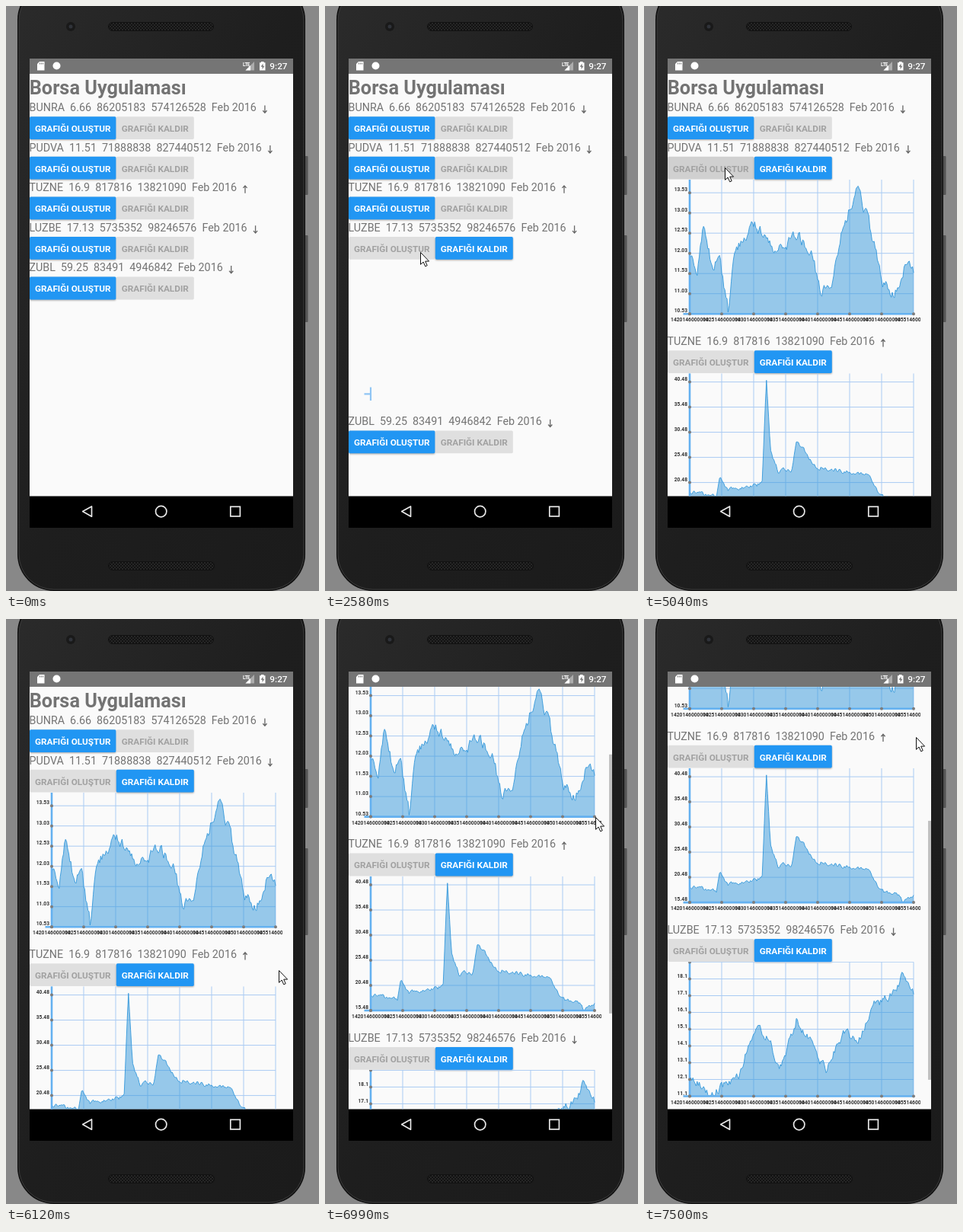
An HTML page for the animation above (7.53 s loop, 411 by 768 pixels).

```html
<!DOCTYPE html>
<html lang="tr">
<head>
<meta charset="utf-8">
<title>Borsa Uygulaması</title>
<style>
  html, body { margin: 0; width: 100%; height: 100%; overflow: hidden; background: #888; }
  svg { display: block; width: 411px; height: 768px; font-family: Roboto, sans-serif; }
  text { white-space: pre; }
  .title { font-size: 25.3px; font-weight: 700; fill: #737373; }
  .info { font-size: 14.3px; fill: #737373; }
  .arrow { fill: none; stroke: #666; stroke-width: 1.3; }
  .btn text { font-size: 11.78px; font-weight: 700; text-anchor: middle; }
  .on rect { fill: #2196f3; filter: drop-shadow(0 1.5px 1.3px rgba(0, 0, 0, .35)); }
  .on text { fill: #fff; }
  .off rect { fill: #dfdfdf; }
  .off text { fill: #a1a1a1; }
  .btn .ripple { fill: #000; filter: none; }
  .label { font-size: 6.7px; font-weight: 700; fill: #333; }
  .grid { stroke: #a9cbf3; stroke-width: 1; fill: none; }
  .axis { stroke: #64b1f0; stroke-width: 2.6; fill: none; }
  .stub { stroke: #90c5f4; stroke-width: 2.2; fill: none; }
  .area { fill: #3498db; fill-opacity: .5; }
  .line { fill: none; stroke: #3498db; stroke-width: .9; }
  .dot { fill: #7d7d7d; }
</style>
</head>
<body>
<svg viewBox="0 0 411 768">
  <defs>
    <linearGradient id="body" x1="0" y1="0" x2="1" y2="1">
      <stop offset="0" stop-color="#2b2b2b"/>
      <stop offset=".5" stop-color="#1e1e1e"/>
      <stop offset="1" stop-color="#1b1b1b"/>
    </linearGradient>
    <pattern id="mesh" width="4" height="4" patternUnits="userSpaceOnUse">
      <rect width="4" height="4" fill="#262626"/>
      <circle cx="1" cy="1" r="1" fill="#0b0b0b"/>
      <circle cx="3" cy="3" r="1" fill="#0b0b0b"/>
    </pattern>
    <clipPath id="view"><rect x="31" y="89" width="346" height="554.5"/></clipPath>
    <clipPath id="plot"><rect x="31" y="0" width="332" height="202"/></clipPath>
  </defs>

  <rect width="411" height="768" fill="#888"/>
  <rect x="391" y="197" width="5.500" height="51" rx="1" fill="#555"/>
  <rect x="391" y="301" width="5.500" height="114" rx="1" fill="#555"/>
  <rect x="15" y="-30" width="378" height="798" rx="48" fill="#111"/>
  <rect x="17" y="-27" width="374" height="793" rx="46" fill="url(#body)" stroke="#3c3c3c"/>
  <rect x="134.500" y="21.500" width="138" height="11" rx="5.500" fill="url(#mesh)" stroke="#111"/>
  <rect x="134.500" y="729.500" width="139" height="11" rx="5.500" fill="url(#mesh)" stroke="#111"/>
  <circle cx="85" cy="27" r="6" fill="#191919"/>
  <circle cx="85" cy="27" r="2.500" fill="#30333a"/>

  <rect x="31" y="69" width="346" height="616" fill="#000"/>
  <rect x="31" y="89" width="346" height="554.500" fill="#fafafa"/>
  <g clip-path="url(#view)">
    <g id="list"><text class="title" x="30.700" y="116">Borsa Uygulaması</text></g>
    <rect id="bar" x="373" width="4" height="340" fill="#c1c1c1"/>
  </g>

  <rect x="31" y="69" width="346" height="20" fill="#757575"/>
  <g fill="#fff">
    <path d="M44 73h6.500v11.500h-9.500v-8.500z"/>
    <path d="M44.500 74.500v2M46.500 74.500v2M48.500 74.500v2" stroke="#757575"/>
    <circle cx="66.500" cy="78.500" r="5"/>
    <text x="311" y="78.500" font-size="6.300" font-weight="700" letter-spacing="-.4">LTE</text>
    <path d="M326 73v11.500h-11.500z" fill-opacity=".4"/>
    <path d="M321 78v6.500h-6.500z"/>
    <path d="M333 74.200h2v-1.200h3.500v1.200h2v10.300h-7.500z"/>
    <path d="M337.500 75.500l-2.800 4.200h1.900v3.500l2.700-4.500h-1.800z" fill="#757575"/>
    <text x="346.300" y="83" font-size="11.800" font-weight="500">9:27</text>
  </g>
  <g fill="none" stroke="#e8e8e8" stroke-width="1.700">
    <path d="M112.500 657v13.200l-11.800-6.600z" stroke-linejoin="round"/>
    <circle cx="203.700" cy="663.600" r="7.200"/>
    <rect x="294.800" y="657.300" width="12.600" height="12.600"/>
  </g>
  <path id="cursor" d="M.5.5v15.800l3.600-3.300 2.600 5.800 2.500-1.100-2.500-5.600h4.900z" fill="#fff" stroke="#111"/>
</svg>

<script>
const LOOP = 7530, STEP = 30, PITCH = 52.6, CHART = 201.8;
const LEFT = 60, WIDTH = 294, BASE = 176.3;
const $ = id => document.getElementById(id);

// shape: turning points of the curve, x then height above the axis
const rows = [
  { text: 'BUNRA  6.66  86205183  574126528  Feb 2016' },
  { text: 'PUDVA  11.51  71888838  827440512  Feb 2016',
    open: 4530, fill: 4860, fade: 600, low: 10.53, unit: .5, gap: 26.5, digits: 2, noise: 13,
    shape: [0,78, 10,52, 19,122, 30,58, 38,80, 51,2, 59,80, 85,120, 115,82, 141,104, 160,80,
      172,30, 185,34, 200,110, 221,168, 235,120, 253,44, 268,24, 288,78, 294,54] },
  { text: 'TUZNE  16.9  817816  13821090  Feb 2016', up: true,
    open: 3570, fill: 3960, fade: 150, low: 15.48, unit: 5, gap: 33, digits: 2, noise: 5,
    shape: [0,21, 35,16, 39,41, 50,24, 95,31, 100.8,168, 106,76, 116,48, 134,50, 140,90,
      165,54, 235,42, 250,14, 275,11, 281,0, 294,8] },
  { text: 'LUZBE  17.13  5735352  98246576  Feb 2016',
    open: 2340, fill: 2730, fade: 240, low: 11.1, unit: 1, gap: 22, digits: 1, noise: 11,
    shape: [0,24, 27,3, 66,28, 72,54, 89,86, 105,76, 118,34, 140,100, 179,36, 203,84,
      222,76, 243,120, 267,134, 281,164, 294,134] },
  { text: 'ZUBL  59.25  83491  4946842  Feb 2016',
    open: 330, fill: 720, close: 1500, fade: 240, low: 50.35, unit: 5, gap: 33, digits: 2, noise: 8,
    shape: [0,40, 95,100, 170,130, 265,70, 294,92] }
];

// Pointer moves: start, end, x, y
const moves = [
  [30, 300, 133, 357], [780, 810, 125, 366], [960, 1110, 163, 375], [1110, 1260, 199, 366],
  [2010, 2310, 125, 323], [3030, 3330, 116, 275], [4290, 4500, 106, 212], [5040, 5790, 360, 493],
  [5790, 5820, 361, 497], [5940, 6540, 351, 378], [6540, 6990, 355, 260], [6990, 7500, 357, 155]
];
const DRAG = 5940;

const clamp = v => Math.min(1, Math.max(0, v));
const smooth = p => p * p * (3 - 2 * p);
const show = (el, on) => el.setAttribute('visibility', on ? 'visible' : 'hidden');

function add(parent, tag, attrs, text) {
  const el = document.createElementNS('http://www.w3.org/2000/svg', tag);
  for (const k in attrs) el.setAttribute(k, attrs[k]);
  if (text) el.textContent = text;
  return parent.appendChild(el);
}

function random(seed) {
  return () => (seed = seed * 16807 % 2147483647) / 2147483647;
}

function heightAt(shape, x) {
  let i = 2;
  while (i < shape.length - 2 && shape[i] < x) i += 2;
  const [x0, h0, x1, h1] = shape.slice(i - 2, i + 2);
  return h0 + (h1 - h0) * clamp((x - x0) / (x1 - x0));
}

function outline({ shape, noise }, seed) {
  const rnd = random(seed), days = 210, pts = [];
  let drift = 0;
  for (let d = 0; d <= days; d++) {
    const x = d / days * WIDTH;
    drift = drift * .5 + (rnd() - .5) * noise;
    const h = Math.max(0, heightAt(shape, x) + drift);
    pts.push((LEFT + x).toFixed(1) + ',' + (BASE - h).toFixed(1));
  }
  return pts.join(' ');
}

function makeButton(parent, x, width, label) {
  const g = add(parent, 'g', {});
  const box = { x, y: 145.2, width, height: 29.8, rx: 1.7 };
  add(g, 'rect', box);
  const ripple = add(g, 'rect', { ...box, class: 'ripple', opacity: 0 });
  add(g, 'text', { x: x + width / 2, y: 165 }, label);
  return { ripple, setOn: on => g.setAttribute('class', 'btn ' + (on ? 'on' : 'off')) };
}

function makeChart(parent, row, seed) {
  const box = add(parent, 'g', { transform: 'translate(0 175.300)', 'clip-path': 'url(#plot)' });
  row.stub = add(box, 'path', { class: 'stub', d: `M51.500 ${BASE}H60.500M60 ${BASE - 9}v17.500` });
  const full = row.full = add(box, 'g', {});
  const xs = Array.from({ length: 8 }, (_, n) => LEFT + n * WIDTH / 7);
  const ys = Array.from({ length: Math.floor(BASE / row.gap) + 1 }, (_, n) => BASE - n * row.gap);
  const grid = xs.map(x => `M${x} 0V${BASE}`).concat(ys.map(y => `M${LEFT} ${y}h${WIDTH}`));
  const pts = outline(row, seed);

  add(full, 'path', { class: 'grid', d: grid.join('') });
  add(full, 'polygon', { class: 'area', points: `${LEFT},${BASE} ${pts} ${LEFT + WIDTH},${BASE}` });
  add(full, 'polyline', { class: 'line', points: pts });
  add(full, 'path', { class: 'axis', d: `M${LEFT} 0V${BASE}M51.500 ${BASE}H${LEFT + WIDTH}` });
  ys.forEach((y, n) => {
    add(full, 'circle', { class: 'dot', cx: LEFT, cy: y, r: 2 });
    add(full, 'text', { class: 'label', x: 57, y: y - 1.8, 'text-anchor': 'end' },
      (row.low + n * row.unit).toFixed(row.digits));
  });
  xs.forEach((x, n) => {
    add(full, 'circle', { class: 'dot', cx: x, cy: BASE, r: 2 });
    add(full, 'text', { class: 'label', x, y: BASE + 10.3, 'text-anchor': 'middle' },
      1420 + n * 5 + '146000000');
  });
}

rows.forEach((row, i) => {
  const g = row.g = add($('list'), 'g', {});
  const info = add(g, 'text', { class: 'info', x: 30.5, y: 138 }, row.text);
  const end = 30.5 + info.getComputedTextLength() + 11;
  add(g, 'path', {
    class: 'arrow', d: 'M0-5V4.500M-2.600 1.800L0 4.800L2.600 1.800',
    transform: `translate(${end} 135.500) scale(1 ${row.up ? -1 : 1})`
  });
  row.make = makeButton(g, 31, 113.5, 'GRAFIĞI OLUŞTUR');
  row.drop = makeButton(g, 144.8, 102, 'GRAFIĞI KALDIR');
  if (row.shape) makeChart(g, row, 71 + i * 977);
});

function pointer(t) {
  let x = 240, y = 455;
  for (const [from, to, nx, ny] of moves) {
    const p = clamp((t - from) / (to - from));
    const e = from < DRAG ? smooth(p) : p;
    x += (nx - x) * e;
    y += (ny - y) * e;
  }
  return `translate(${Math.round(x)} ${Math.round(y)})`;
}

function render(t) {
  let y = 0;
  rows.forEach(row => {
    const open = t >= row.open && !(t >= row.close);
    row.g.setAttribute('transform', `translate(0 ${y.toFixed(2)})`);
    row.make.setOn(!open);
    row.drop.setOn(open);
    if (row.shape) {
      show(row.stub, open && t < row.fill);
      show(row.full, open && t >= row.fill);
      const left = open ? clamp((row.open + row.fade - t) / 120) : 0;
      row.make.ripple.setAttribute('opacity', left * .09);
    }
    y += PITCH + (open ? CHART : 0);
  });

  // The list follows the drag late and gathers speed
  const top = 286.5 * clamp((t - 6300) / 1200) ** 1.235;
  $('list').setAttribute('transform', `translate(0 ${-top.toFixed(1)})`);
  $('bar').setAttribute('y', 89 + top * .614);
  show($('bar'), top > 0);

  $('cursor').setAttribute('transform', pointer(t));
  show($('cursor'), t >= 30 && (t < 1650 || t >= 1710));
}

let start;
function tick(now) {
  start ??= now;
  render(Math.floor((now - start) % LOOP / STEP) * STEP);
  requestAnimationFrame(tick);
}
render(0);
requestAnimationFrame(tick);
</script>
</body>
</html>
```
